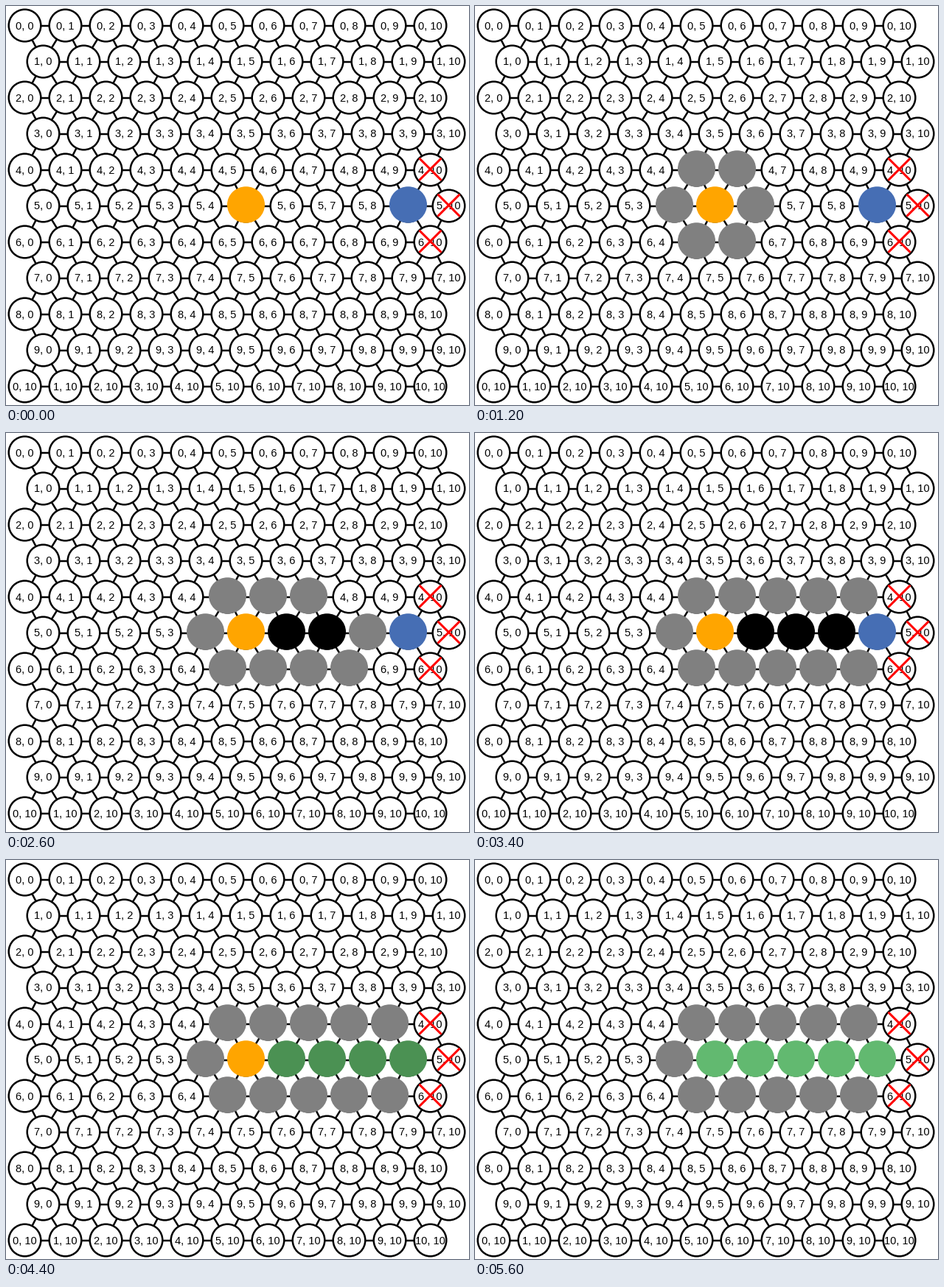
Write a matplotlib script that moves like this. It is 628 px wide and 542 px high and loops after 5800 ms.

```python
import matplotlib.pyplot as plt
from matplotlib.animation import FuncAnimation
from matplotlib.patches import Circle, Ellipse

W, H, DPI = 628, 542, 100
PX = 72 / DPI
N = 11
STEP_MS, STEPS = 200, 29

ORANGE, BLUE, GRAY, BLACK = "#ffa500", "#466eb4", "#808080", "#000000"
GREEN, LIGHT = "#4b9153", "#62b970"
START, GOAL = (5, 5), (5, 9)
BLOCKED = [(4, 10), (5, 10), (6, 10)]


def center(r, c):
    return 25.5 + 55 * c + 25 * (r % 2), 26.5 + 49 * r


def search_events():
    """Colour changes of the search, one per step."""
    r, first, last = START[0], START[1], GOAL[1]
    around = [(r, 6), (r + 1, 6), (r + 1, 5), (r, 4), (r - 1, 5), (r - 1, 6)]
    events = [(cell, GRAY) for cell in around]
    for c in range(first + 1, last):
        events.append(((r, c), BLACK))
        for cell in [(r, c + 1), (r + 1, c + 1), (r - 1, c + 1)]:
            if cell != GOAL:
                events.append((cell, GRAY))
    events.append((GOAL, BLACK))
    events += [((r, c), GREEN) for c in range(last, first - 1, -1)]
    events += [((r, c), LIGHT) for c in range(first, last + 1)]
    return events


EVENTS = search_events()

fig = plt.figure(figsize=(W / DPI, H / DPI), dpi=DPI, facecolor="white")
ax = fig.add_axes([0, 0, 1, 1])
ax.set_xlim(0, W)
ax.set_ylim(H, 0)
ax.axis("off")


def line(a, b, color, width, z):
    ax.plot([a[0], b[0]], [a[1], b[1]], color=color, lw=width * PX,
            solid_capstyle="butt", zorder=z)


for r in range(N):
    for c in range(N):
        x, y = center(r, c)
        shift = r % 2
        for nb in [(r, c + 1), (r + 1, c + shift - 1), (r + 1, c + shift)]:
            if nb[0] < N and 0 <= nb[1] < N:
                line((x, y), center(*nb), "black", 2.5, 1)
        ax.add_patch(Circle((x, y), 21.8, fc="white", ec="black",
                            lw=2.5 * PX, zorder=2))
        label = f"{c}, {r}" if r == N - 1 else f"{r}, {c}"
        ax.text(x, y + 5, label, ha="center", va="baseline", zorder=3,
                family="Liberation Sans", fontsize=14.67 * PX)

for cell in BLOCKED:
    x, y = center(*cell)
    y -= 0.8
    for s in (-1, 1):
        line((x - 15, y - 15 * s), (x + 15, y + 15 * s), "red", 3, 6)

discs = {}
for cell in {START, GOAL, *(cell for cell, _ in EVENTS)}:
    x, y = center(*cell)
    discs[cell] = ax.add_patch(Ellipse((x, y - 1.5), 51, 49.5, lw=0, zorder=4))


def draw(i):
    state = {START: ORANGE, GOAL: BLUE}
    state.update(EVENTS[:i])
    for cell, disc in discs.items():
        disc.set_visible(cell in state)
        disc.set_facecolor(state.get(cell, "white"))
    return list(discs.values())


anim = FuncAnimation(fig, draw, frames=STEPS, interval=STEP_MS,
                     init_func=lambda: draw(0), repeat=True, repeat_delay=0)
plt.show()
```
